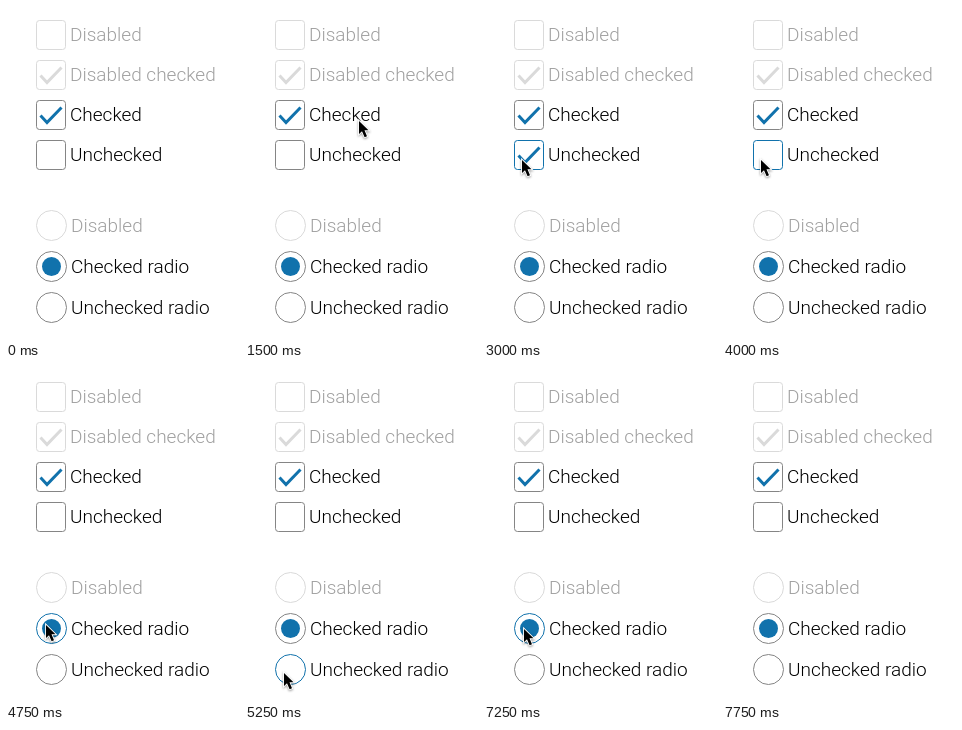
These frames come from a looping animation (233x334 px, 9000 ms). An HTML page:

```html
<!DOCTYPE html>
<html lang="en">
<head>
<meta charset="utf-8">
<style>
html, body { margin: 0; width: 100%; height: 100%; overflow: hidden; background: #fff; }
svg { display: block; }
text { font: 300 19px Roboto, sans-serif; }
.box { fill: #fff; stroke: #858585; }
.check { fill: none; stroke: #1172ac; stroke-width: 3; }
.dot { fill: #1172ac; }
.hover .box { stroke: #1172ac; }
.off text { fill: #a0a0a0; }
.off .box, .off .check { stroke: #dadada; }
#cursor { filter: drop-shadow(0 1px 1px #0006); }
</style>
</head>
<body>
<svg id="stage" width="233" height="334" viewBox="0 0 233 334"></svg>
<script>
const LOOP = 9000;
const stage = document.getElementById('stage');

// label, centre y, is radio, disabled
const rows = [
  ['Disabled', 29, false, true],
  ['Disabled checked', 69, false, true],
  ['Checked', 109, false, false],
  ['Unchecked', 149, false, false],
  ['Disabled', 219.5, true, true],
  ['Checked radio', 260.5, true, false],
  ['Unchecked radio', 301.5, true, false]
];
const CHECKED = 2, UNCHECKED = 3, RADIO_A = 5, RADIO_B = 6;

stage.innerHTML = rows.map(([label, y, radio, off]) => {
  const control = radio
    ? '<circle class="box" cx="45.5" r="15"/><circle class="mark dot" cx="45.5" r="9.5"/>'
    : '<rect class="box" x="30.5" y="-14.5" width="29" height="29" rx="3"/>' +
      '<path class="mark check" d="M34.5 .5L41 7.5L55.5-7.5"/>';
  return `<g class="${off ? 'off' : ''}" transform="translate(0 ${y})">${control}` +
    `<text x="${radio ? 65 : 64}" y="6">${label}</text></g>`;
}).join('') +
  '<path id="cursor" d="M0 0V13L3 10.2L5.6 16.2L8 15.2L5.5 9.3H9.5Z" stroke="#fff" paint-order="stroke" stroke-width="1.8"/>';

const groups = [...stage.querySelectorAll('g')];
const marks = groups.map(g => g.querySelector('.mark'));
const cursor = document.getElementById('cursor');

// The pointer jumps every quarter second: start time, tip x, tip y, hovered row
const pointer = [
  [1500, 114, 115],
  [1750, 58, 147],
  [2000, 44, 152],
  [2250, 40, 155],
  [2750, 39, 155, UNCHECKED],
  [3000, 38, 154, UNCHECKED],
  [4500, 37, 163, UNCHECKED],
  [4750, 40, 257, RADIO_A],
  [5000, 35, 289, RADIO_B],
  [5250, 39, 305, RADIO_B],
  [5750, 39, 281],
  [6000, 38, 261, RADIO_A],
  [7250, 40, 261, RADIO_A],
  [7500, 127, 259, RADIO_A]
];

function draw(now) {
  const t = now % LOOP;
  const during = (from, to) => t >= from && t < to;
  const second = during(5500, 6250);
  const on = [false, true, true, during(3000, 4000), false, !second, second];
  const visible = during(1500, 7750);
  const [, x, y, hovered] = visible ? pointer.findLast(p => p[0] <= t) : [];

  groups.forEach((g, i) => {
    g.classList.toggle('hover', i === hovered);
    marks[i].style.display = on[i] ? '' : 'none';
  });
  cursor.style.display = visible ? '' : 'none';
  if (visible) cursor.setAttribute('transform', `translate(${x} ${y})`);
}

const start = performance.now();
function tick() {
  draw(performance.now() - start);
  requestAnimationFrame(tick);
}
tick();
</script>
</body>
</html>
```
